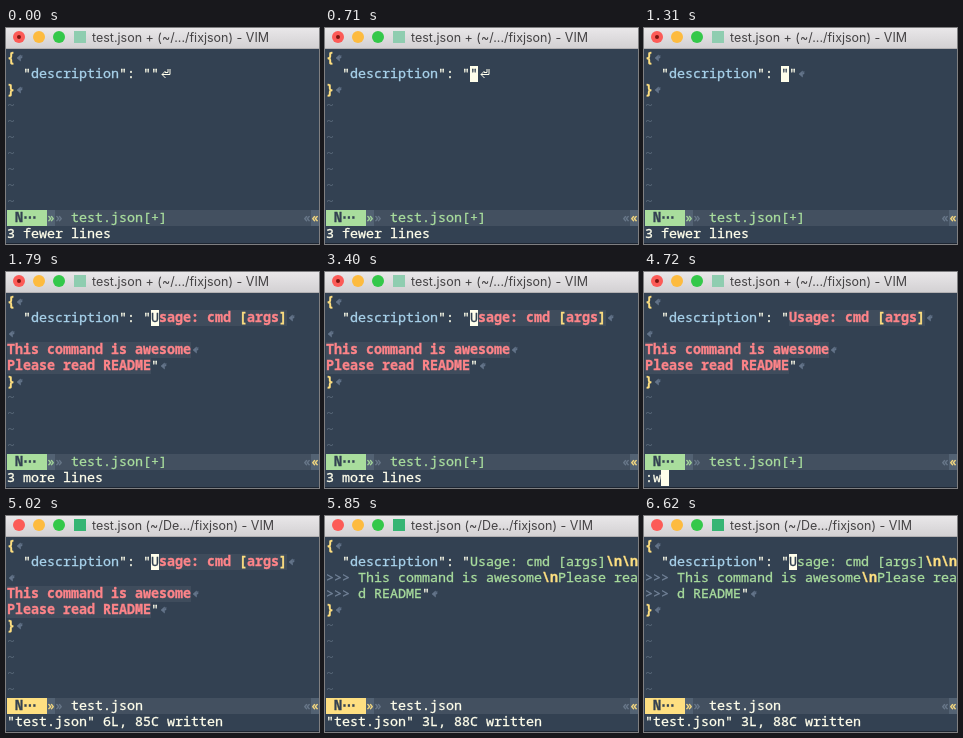
Write an HTML page that moves like this. It is 313 px wide and 216 px high and loops after 8890 ms.

```html
<!DOCTYPE html>
<html lang="en">
<head>
<meta charset="utf-8">
<title>Editor</title>
<style>
  html, body { margin: 0; width: 100%; height: 100%; overflow: hidden; background: #334152; }
  #stage { position: relative; width: 313px; height: 216px; overflow: hidden; background: #334152; }
  #stage::after { content: ""; position: absolute; left: 0; right: 0; bottom: 0; height: 1px; background: #1d2531; }
  #bar { position: absolute; left: 0; top: 0; width: 313px; height: 20px; border-bottom: 1px solid #b3b1b3;
    background: linear-gradient(#e9e7e9, #d3d1d3); }
  #bar i { position: absolute; top: 3px; width: 12px; height: 12px; border-radius: 50%; }
  #dot { position: absolute; left: 4px; top: 4px; width: 4px; height: 4px; border-radius: 50%; background: #7d1510; }
  #icon { position: absolute; left: 68px; top: 3px; width: 12px; height: 12px; background: #8fcdb0; }
  #title { position: absolute; left: 86px; top: 1px; white-space: pre; color: #454345;
    font: 12.5px/17px Inter, sans-serif; }
  .row, .cell { position: absolute; height: 16px; white-space: pre; color: #fffeeb;
    font: 13.333px/14px "Noto Sans Mono", monospace; -webkit-text-stroke: 0.3px; }
  .row { left: 1px; }
  .row span { display: inline-block; height: 16px; vertical-align: top; }
  .row svg { display: inline-block; vertical-align: top; overflow: visible; }
  .status { width: 312px; background: #435060; }
  .cell { width: 8px; background: #fffeeb; color: #334152; }
  .gold { color: #fedf81; font-weight: 700; }
  .key { color: #a8d2eb; }
  .str { color: #a9dd9d; }
  .err { color: #fd8489; background: #3f4c5c; font-weight: 600; }
  .brk { color: #fedf81; background: #3f4c5c; font-weight: 700; }
  .dim { color: #5c6b7c; -webkit-text-stroke: 0; }
  .wrap { color: #74849a; }
  .sep { background: #536273; }
</style>
</head>
<body>
<div id="stage">
  <div id="bar">
    <i style="left:7px;background:#fc5b57"><b id="dot"></b></i>
    <i style="left:27px;background:#fdbb3f"></i>
    <i style="left:47px;background:#34c84a"></i>
    <b id="icon"></b>
    <span id="title"></span>
  </div>
  <div id="text"></div>
</div>
<script>
const LOOP = 8890, CELL = 8, LINE = 16, TOP = 22;
const [text, title, icon, dot] = ['text', 'title', 'icon', 'dot'].map(id => document.getElementById(id));

// Tokens are [class, text]; the classes "eol" and "ret" draw line-end marks.
const EOL = ['eol'], RET = ['ret'];
const open = [['gold', '{'], EOL], close = [['gold', '}'], EOL];
const key = [['', '  "'], ['key', 'description'], ['', '": "']];
const emptyValue = end => [open, [...key, ['', '"'], end], close];

const pasted = [
  open,
  [...key, ['err', 'Usage: cmd '], ['brk', '['], ['err', 'args'], ['brk', ']'], EOL],
  [EOL],
  [['err', 'This command is awesome'], EOL],
  [['err', 'Please read README'], ['', '"'], EOL],
  close
];
const fixed = [
  open,
  [...key, ['str', 'Usage: cmd [args]'], ['gold', '\\n\\n']],
  [['wrap', '>>> '], ['str', 'This command is awesome'], ['gold', '\\n'], ['str', 'Please rea']],
  [['wrap', '>>> '], ['str', 'd README'], ['', '"'], EOL],
  close
];

const page = (body, msg, saved = false) => ({ body, msg, saved });
const before = page(emptyValue(RET), '3 fewer lines');
const ready = page(emptyValue(EOL), '3 fewer lines');
const broken = page(pasted, '3 more lines');
const colon = page(pasted, ':');
const write = page(pasted, ':w');
const written = page(pasted, '"test.json" 6L, 85C written', true);
const done = page(fixed, '"test.json" 3L, 88C written', true);

// Cursors are [row, column, character].
const quote1 = [1, 17, '"'], quote2 = [1, 18, '"'], onU = [1, 18, 'U'];
const steps = [
  [0, before], [50, before, quote2], [470, before], [710, before, quote2],
  [1130, before], [1220, ready], [1310, ready, quote1],
  [1790, broken, onU], [2500, broken], [2740, broken, onU], [3160, broken], [3400, broken, onU],
  [3640, colon, [11, 1, ' ']], [3760, write, [11, 2, ' ']], [4480, write], [4720, write, [11, 2, ' ']],
  [5020, written, onU],
  [5850, done], [6090, done, onU], [6510, done], [6620, done, onU]
];

const marks = {
  eol: '<svg width="8" height="16"><path d="M2 8L5.5 5V11ZM5.5 8H7V5" fill="#64748a" stroke="#64748a" stroke-width=".6"/></svg>',
  ret: '<svg width="8" height="16"><path d="M11 3V8.5H3M6.5 5L3 8.5L6.5 12M9 3V6.5H6" fill="none" stroke="#fffeeb"/></svg>'
};

function addRow(row, tokens, cls = '') {
  const line = document.createElement('div');
  line.className = 'row ' + cls;
  line.style.top = TOP + row * LINE + 'px';
  for (const [kind, str, css] of tokens) {
    const span = document.createElement('span');
    if (marks[kind]) span.innerHTML = marks[kind];
    else {
      span.className = kind;
      span.textContent = str;
      if (css) span.style.cssText = css;
    }
    line.append(span);
  }
  text.append(line);
}

function draw([, { body, msg, saved }, cursor]) {
  const accent = saved ? '#fedf81' : '#a9dd9d';
  const mode = `background:${accent};color:#334152;font-weight:700;`;
  text.replaceChildren();
  title.textContent = saved ? 'test.json (~/De.../fixjson) - VIM' : 'test.json + (~/.../fixjson) - VIM';
  icon.style.background = saved ? '#36b574' : '#8fcdb0';
  dot.hidden = saved;
  dot.style.display = saved ? 'none' : 'block';

  for (let r = 0; r < 10; r++) addRow(r, body[r] || [['dim', '~']]);

  const name = saved ? ' test.json' : ' test.json[+]';
  addRow(10, [
    ['', ' N', mode],
    ['', '⋯', mode + 'width:24px'],
    ['sep', '»', `color:${accent}`],
    ['', '»', 'color:#6b7a8c'],
    ['', name.padEnd(30), saved ? '' : `color:${accent}`],
    ['', '«', 'color:#6b7a8c'],
    ['sep', '«', 'color:#fedf81']
  ], 'status');
  addRow(11, [['', msg]]);

  if (cursor) {
    const [row, col, char] = cursor;
    const cell = document.createElement('div');
    cell.className = 'cell';
    cell.style.left = 1 + col * CELL + 'px';
    cell.style.top = TOP + row * LINE + 'px';
    cell.textContent = char;
    text.append(cell);
  }
}

const start = performance.now();
let shown;
function tick() {
  const t = (performance.now() - start) % LOOP;
  const step = steps.findLast(s => s[0] <= t) || steps[0];
  if (step !== shown) draw(shown = step);
  requestAnimationFrame(tick);
}
tick();
</script>
</body>
</html>
```
